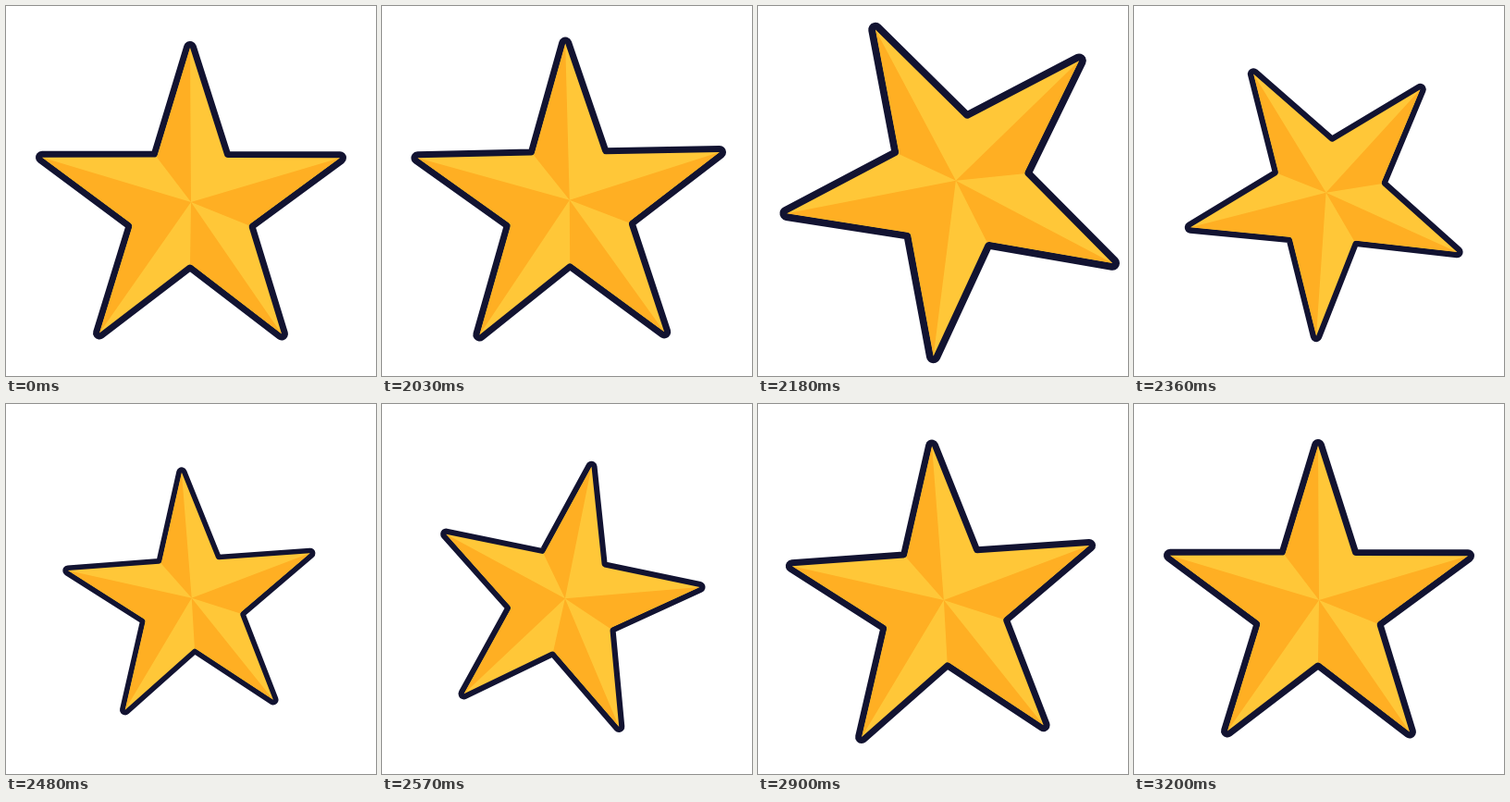
An HTML page with a canvas for the animation above (3.23 s loop, 400 by 400 pixels).

```html
<!DOCTYPE html>
<html lang="en">
<head>
<meta charset="utf-8">
<title>Star</title>
<style>
html, body { margin: 0; height: 100%; overflow: hidden; background: #fff; }
canvas { display: block; width: 400px; height: 400px; }
</style>
</head>
<body>
<canvas width="400" height="400"></canvas>
<script>
const ctx = document.querySelector('canvas').getContext('2d');
const LOOP = 3230, HOLD = 2000, STEP = 30;
const center = [200, 212];

// Clockwise from the top: tips at even indices, notches at odd ones.
const points = [
  [199, 45], [237, 164], [361, 164.3], [262, 237], [298, 354.5],
  [199, 278.5], [101, 353.5], [137, 236.5], [39, 163.7], [163, 163.5]
];
const darkFacets = [2, 4, 6, 7, 9];

// Step, angle, scale, x shift, y shift
const keys = [
  [0, 0, 1, 0, 0],
  [1, -1.2, 1.014, 2.5, -2.3],
  [4, -16.5, 1.08, 7.8, -19],
  [6, -27.7, 1.107, 7.7, -23],
  [8, -34.3, 1.065, 6, -20.5],
  [10, -36, 0.99, 4, -14.5],
  [12, -31.1, 0.9, 2, -7.5],
  [16, -4.2, 0.815, 0, 0],
  [19, 11.7, 0.87, 0, 0],
  [20, 13, 0.905, 0, 0],
  [24, 2.5, 1, 0, 0],
  [27.5, -6, 1, 0, 0],
  [30, -4.05, 1, 0, 0],
  [36, 0.8, 1, 0, 0],
  [40, 0, 1, 0, 0]
];

const star = new Path2D();
star.moveTo(...points[0]);
for (let i = 1; i < 10; i += 2) {
  const tip = points[(i + 1) % 10];
  star.arcTo(...points[i], ...tip, 4);
  star.lineTo(...tip);
}
star.closePath();

const facets = new Path2D();
for (const i of darkFacets) {
  facets.moveTo(...center);
  facets.lineTo(...points[i]);
  facets.lineTo(...points[(i + 1) % 10]);
  facets.closePath();
}

function slope(i, col) {
  return (keys[i + 1][col] - keys[i][col]) / (keys[i + 1][0] - keys[i][0]);
}

// Flat at turning points, harmonic mean of the neighbouring slopes elsewhere
function tangent(i, col) {
  if (i === 0 || i === keys.length - 1) return 0;
  const a = slope(i - 1, col), b = slope(i, col);
  return a * b > 0 ? 2 * a * b / (a + b) : 0;
}

function valueAt(step, col) {
  let i = 0;
  while (i < keys.length - 2 && step > keys[i + 1][0]) i++;
  const a = keys[i], b = keys[i + 1], span = b[0] - a[0];
  const u = (step - a[0]) / span, v = 1 - u;
  return a[col] * v * v * (1 + 2 * u) + b[col] * u * u * (1 + 2 * v)
    + span * u * v * (v * tangent(i, col) - u * tangent(i + 1, col));
}

function draw(time) {
  const step = Math.max(0, Math.floor((time % LOOP - HOLD) / STEP));
  const [angle, scale, x, y] = [1, 2, 3, 4].map(col => valueAt(step, col));
  ctx.fillStyle = '#fff';
  ctx.fillRect(0, 0, 400, 400);
  ctx.save();
  ctx.translate(200 + x, 200 + y);
  ctx.rotate(angle * Math.PI / 180);
  ctx.scale(scale, scale);
  ctx.translate(-200, -200);
  ctx.lineWidth = 14;
  ctx.lineJoin = 'round';
  ctx.strokeStyle = '#121331';
  ctx.stroke(star);
  ctx.fillStyle = '#ffc738';
  ctx.fill(star);
  ctx.clip(star);
  ctx.fillStyle = '#ffaf23';
  ctx.fill(facets);
  ctx.restore();
}

const start = performance.now();
function tick() {
  draw(performance.now() - start);
  requestAnimationFrame(tick);
}
tick();
</script>
</body>
</html>
```
